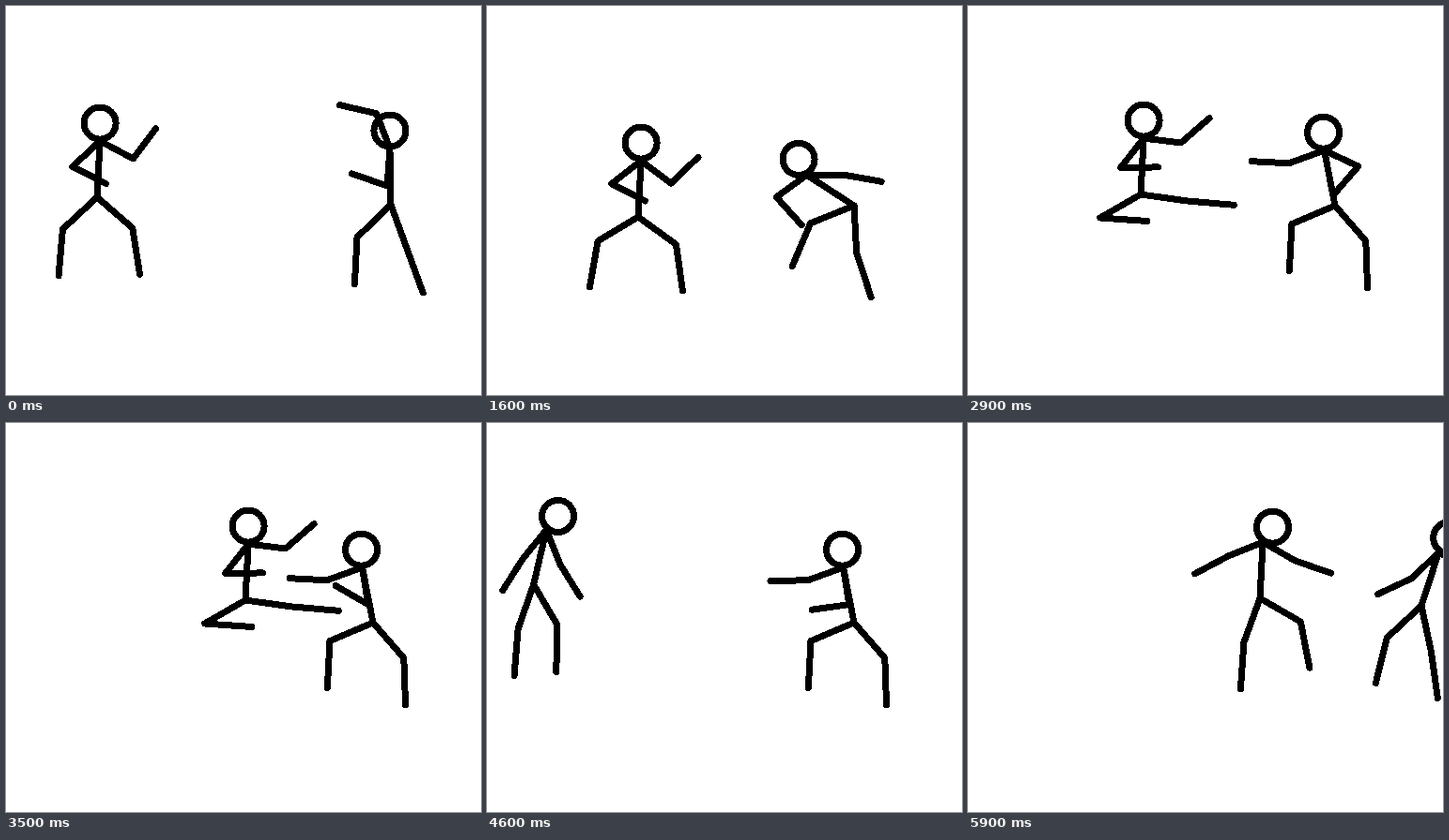
Write an HTML page that moves like this. It is 506x415 px and loops after 6000 ms.

```html
<!DOCTYPE html>
<html lang="en">
<head>
<meta charset="utf-8">
<title>Stick fight</title>
<style>
  html, body { margin: 0; width: 100%; height: 100%; overflow: hidden; background: #fff; }
  svg { display: block; }
  g { fill: none; stroke: #000; stroke-width: 7; stroke-linecap: round; stroke-linejoin: round; }
</style>
</head>
<body>
<svg width="506" height="415" viewBox="0 0 506 415" shape-rendering="crispEdges">
  <g id="left"><path/><circle r="17"/></g>
  <g id="right"><path/><circle r="17"/></g>
</svg>
<script>
const LOOP = 6000, STEP = 100;
const TORSO = 60, NECK = 19, ARM = 40, LEG = 50;

// Angles are in degrees, clockwise from the right; a limb is [upper, lower].
// A pose names only what sets it apart from the one it builds on.
const vary = (pose, changes) => ({ ...pose, ...changes });
const shift = (pose, x, y) => vary(pose, { hip: [x, y] });

const stance = {
  hip: [97, 204], torso: -87, tilt: -3,
  front: [28, -53], back: [137, 27], near: [137, 95], far: [41, 81]
};
const kick = vary(stance, {
  hip: [180, 169], front: [36, -63], back: [178, 122], near: [80, 150], far: [7, 5]
});
const ready = vary(stance, {
  hip: [161, 225], front: [37, -44], back: [142, 27], near: [149, 100], far: [36, 82]
});
const block = vary(ready, { front: [37, -95] });
const flyKick = vary(stance, {
  hip: [184, 201], front: [7, -41], back: [128, -1], near: [150, 4], far: [8, 5]
});
const slump = {
  hip: [40, 187], torso: -72, tilt: 26,
  front: [87, 77], back: [115, 108], near: [109, 95], far: [90, 91]
};
const leap = vary(stance, {
  hip: [282, 117], tilt: 30, front: [30, 19], back: [158, 152], near: [110, 94], far: [-3, 92]
});
const land = vary(leap, { hip: [311, 187], far: [30, 79] });

const raised = {
  hip: [410, 212], torso: -91, tilt: 1,
  front: [-111, -167], back: [94, -161], near: [136, 93], far: [70, 70]
};
const knocked = {
  hip: [399, 215], torso: -45, tilt: 26,
  front: [-167, -140], back: [21, 31], near: [-170, 144], far: [101, 61]
};
const charge = {
  hip: [391, 213], torso: -147, tilt: 30,
  front: [144, 48], back: [0, 10], near: [158, 113], far: [87, 72]
};
const guard = {
  hip: [391, 213], torso: -101, tilt: 8,
  front: [160, 183], back: [25, 131], near: [157, 93], far: [49, 88]
};
const recover = vary(guard, { hip: [425, 213], torso: -85, back: [10, 0] });
const swing = vary(guard, { back: [-95, -88] });
const strike = vary(guard, { torso: -113, back: [170, 170] });
const parry = vary(guard, { back: [81, -150] });
const push = vary(guard, { front: [160, 179], back: [81, 172] });
const brace = vary(guard, { front: [140, 164], back: [16, 105] });
const thrown = {
  hip: [483, 195], torso: -72, tilt: 18,
  front: [136, 155], back: [30, 60], near: [137, 104], far: [78, 82]
};

// Each move: arrival time, pose, then optional easing power and arc height.
const moves = {
  left: [
    [0, stance], [700, kick], [800, kick], [1300, ready], [1700, ready],
    [1900, block], [2100, ready], [2800, ready], [2900, flyKick],
    [3500, shift(flyKick, 255, 189)], [4000, slump, 1, 35],
    [4200, shift(slump, 34, 187)], [4900, shift(leap, 82, 142), 2],
    [5300, leap], [5600, shift(leap, 297, 118)], [5900, land, 1.7]
  ],
  right: [
    [0, raised], [500, raised], [700, knocked], [1400, recover], [1600, charge],
    [1900, swing], [2100, strike], [2300, strike], [2800, guard], [3100, guard],
    [3500, parry], [3800, push], [4900, push], [5300, brace], [5500, brace],
    [5900, thrown]
  ]
};

const mix = (a, b, u) => a + (b - a) * u;
const mixAngle = (a, b, u) => a + (((b - a + 540) % 360 + 360) % 360 - 180) * u;

function poseAt(list, t) {
  const i = Math.max(1, list.findIndex(m => m[0] >= t));
  const [t0, from] = list[i - 1], [t1, to, power = 1, arc = 0] = list[i];
  const u = ((t - t0) / (t1 - t0)) ** power;
  const pose = { hip: from.hip.map((v, k) => mix(v, to.hip[k], u)) };
  pose.hip[1] -= arc * 4 * u * (1 - u);
  for (const key of ['torso', 'tilt']) pose[key] = mixAngle(from[key], to[key], u);
  for (const key of ['front', 'back', 'near', 'far'])
    pose[key] = from[key].map((a, k) => mixAngle(a, to[key][k], u));
  return pose;
}

function reach([x, y], deg, len) {
  const r = deg * Math.PI / 180;
  return [x + len * Math.cos(r), y + len * Math.sin(r)];
}

function limb(start, [upper, lower], len) {
  const mid = reach(start, upper, len);
  return `M${start}L${mid}L${reach(mid, lower, len)}`;
}

function draw(id, { hip, torso, tilt, front, back, near, far }) {
  const [body, head] = document.getElementById(id).children;
  const neck = reach(hip, torso, TORSO);
  const [cx, cy] = reach(neck, torso + tilt, NECK);
  body.setAttribute('d', `M${hip}L${neck}` +
    limb(neck, front, ARM) + limb(neck, back, ARM) +
    limb(hip, near, LEG) + limb(hip, far, LEG));
  head.setAttribute('cx', cx);
  head.setAttribute('cy', cy);
}

const start = performance.now();
function render() {
  const now = Math.max(0, performance.now() - start) % LOOP;
  const t = Math.min(Math.floor(now / STEP) * STEP, LOOP - STEP);
  for (const id in moves) draw(id, poseAt(moves[id], t));
  requestAnimationFrame(render);
}
render();
</script>
</body>
</html>
```
